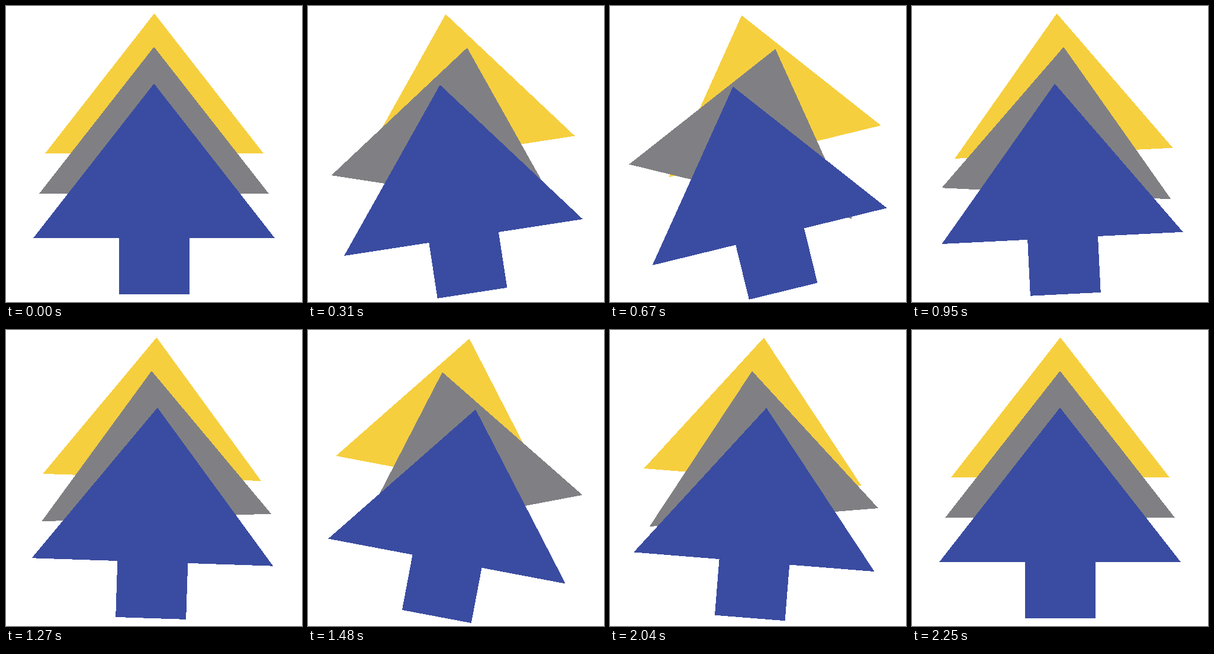
These frames come from a looping animation (500 px wide and 500 px high, 2.28 s). An HTML page:

```html
<!DOCTYPE html>
<html lang="en">
<head>
<meta charset="utf-8">
<title>Swaying tree</title>
<style>
  html, body { margin: 0; width: 100%; height: 100%; overflow: hidden; background: #fff; }
  svg { display: block; width: 100%; height: 100%; shape-rendering: crispEdges; }
</style>
</head>
<body>
<svg viewBox="0 0 500 500">
  <path id="top" fill="#f6cf3f" d="M250.5 12.5 435 249H66z"/>
  <path id="mid" fill="#808084" d="M250 69 444 317H56z"/>
  <path id="low" fill="#3a4ca1" d="M250 131 454 392H310V487H191V392H46z"/>
</svg>
<script>
  const LOOP = 2280, STEP = 30, CYCLE = 73, SWING = 15;
  // Moments at which a step is held 10 ms longer
  const HOLDS = [165, 775, 1235, 1395, 1555, 1745];
  const layers = [
    { id: 'top', y: 131, dir: -1 },
    { id: 'mid', y: 193, dir: 1 },
    { id: 'low', y: 309, dir: -1 }
  ].map(l => ({ ...l, el: document.getElementById(l.id) }));

  // cubic-bezier(.42, 0, .58, 1), solved by bisection
  function easeInOut(x) {
    let lo = 0, hi = 1;
    for (let i = 0; i < 24; i++) {
      const s = (lo + hi) / 2, r = 1 - s;
      if (1.26 * r * r * s + 1.74 * r * s * s + s * s * s < x) lo = s;
      else hi = s;
    }
    return lo * lo * (3 - 2 * lo);
  }

  function angleAt(ms) {
    const held = HOLDS.filter(h => ms >= h).length * 10;
    const step = Math.floor((ms - held) / STEP) % CYCLE;
    const quarter = step / CYCLE * 4;
    const half = quarter % 2;
    const side = quarter < 2 ? 1 : -1;
    return side * SWING * easeInOut(half < 1 ? half : 2 - half);
  }

  const start = performance.now();

  function draw() {
    const a = angleAt((performance.now() - start) % LOOP);
    for (const { el, y, dir } of layers)
      el.setAttribute('transform', `rotate(${(dir * a).toFixed(3)} 250 ${y})`);
    requestAnimationFrame(draw);
  }
  draw();
</script>
</body>
</html>
```
